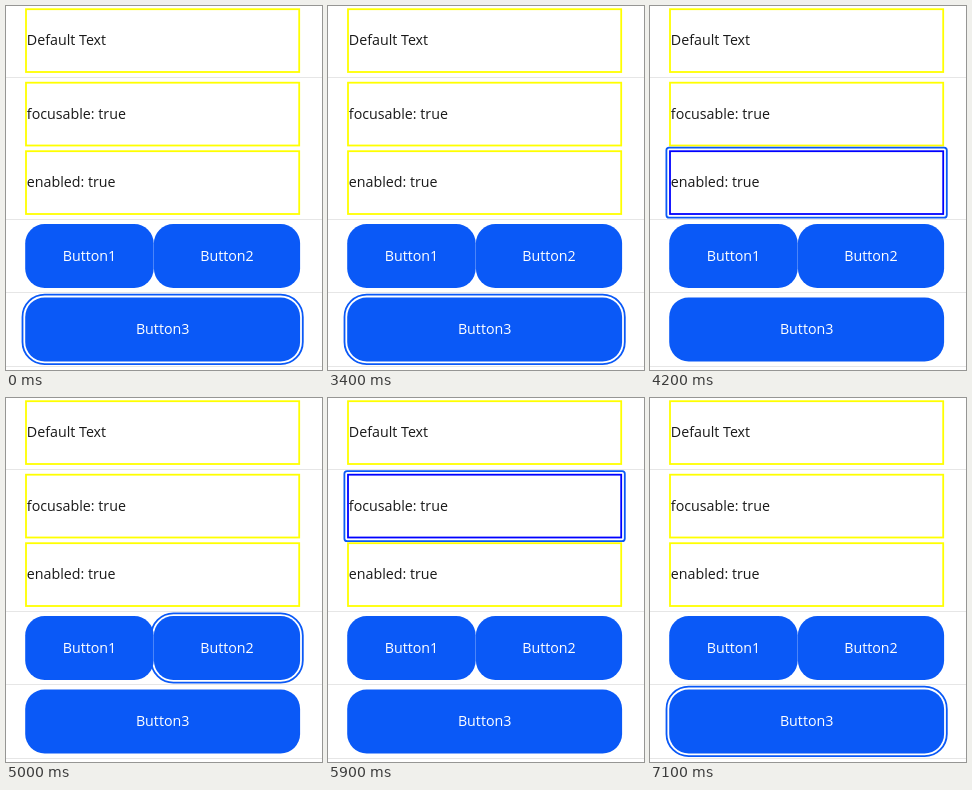
Write an HTML page that moves like this. It is 316 px wide and 364 px high and loops after 8 s.

```html
<!DOCTYPE html>
<html lang="en">
<head>
<meta charset="utf-8">
<title>Focus order</title>
<style>
  html, body { margin: 0; width: 100%; height: 100%; overflow: hidden; background: #fff; }
  svg { display: block; width: 316px; height: 364px; }
  text { font-family: "Open Sans", "Noto Sans", sans-serif; font-size: 14.25px; fill: #191919; }
  .label { font-weight: 500; fill: #fff; text-anchor: middle; }
  .field { fill: none; stroke: #ff0; stroke-width: 1.8; }
  .field.on { stroke: #00f; }
  .button { fill: #0a59f7; }
  .ring { fill: none; stroke: #0a59f7; stroke-width: 1.8; visibility: hidden; }
  .ring.on { visibility: visible; }
  .line { fill: #e6e6e6; }
</style>
</head>
<body>
<svg id="stage" viewBox="0 0 316 364"></svg>
<script>
const LOOP = 8000;
const stage = document.getElementById("stage");

function add(tag, attrs, content) {
  const el = document.createElementNS("http://www.w3.org/2000/svg", tag);
  for (const key in attrs) el.setAttribute(key, attrs[key]);
  if (content) el.textContent = content;
  return stage.appendChild(el);
}

function box(cls, x, y, width, height, rx) {
  return add("rect", { class: cls, x, y, width, height, rx });
}

const fields = {}, rings = {};

function ring(id, x, y, w, h, r) {
  rings[id] = box("ring", x - 2.7, y - 2.7, w + 5.4, h + 5.4, r);
}

function field(id, y, label) {
  fields[id] = box("field", 20, y + 0.9, 273.2, 62.8, 0);
  add("text", { x: 20.8, y: y + 36.9 }, label);
}

function button(x, y, w, label) {
  box("button", x, y, w, 64, 19.5);
  add("text", { class: "label", x: x + w / 2, y: y + 36.8 }, label);
}

for (const y of [71, 213, 286, 360]) box("line", 0, y, 316, 1, 0);

field("plain", 2.3, "Default Text");
field("focusable", 75.8, "focusable: true");
field("enabled", 144.3, "enabled: true");
button(19.2, 218, 128.5, "Button1");
button(147.9, 218, 146.2, "Button2");
button(19.2, 291.4, 274.9, "Button3");

ring("focusable", 19.1, 75.8, 275, 64.6, 2.7);
ring("enabled", 19.1, 144.3, 275, 64.6, 2.7);
ring("b1", 19.2, 218, 128.5, 64, 22.2);
ring("b2", 147.9, 218, 146.2, 64, 22.2);
ring("b3", 19.2, 291.4, 274.9, 64, 22.2);

// [start ms, ringed item, field with the focused border]
const steps = [
  [0, "b3"],
  [500],
  [3400, "b3"],
  [3800, "focusable", "focusable"],
  [4200, "enabled", "enabled"],
  [4500, "b1"],
  [5000, "b2"],
  [5500, "b3"],
  [5800, "focusable"],
  [5900, "focusable", "focusable"],
  [6100, "enabled", "enabled"],
  [6300, "b1", "enabled"],
  [6400, "b1"],
  [6500, "b2"],
  [7100, "b3"]
];

function show(group, id) {
  for (const key in group) group[key].classList.toggle("on", key === id);
}

let current;
const begin = performance.now();

function draw() {
  const t = Math.max(0, performance.now() - begin) % LOOP;
  const step = steps.filter(s => s[0] <= t).pop();
  if (step !== current) {
    current = step;
    show(rings, step[1]);
    show(fields, step[2]);
  }
  requestAnimationFrame(draw);
}
draw();
</script>
</body>
</html>
```
